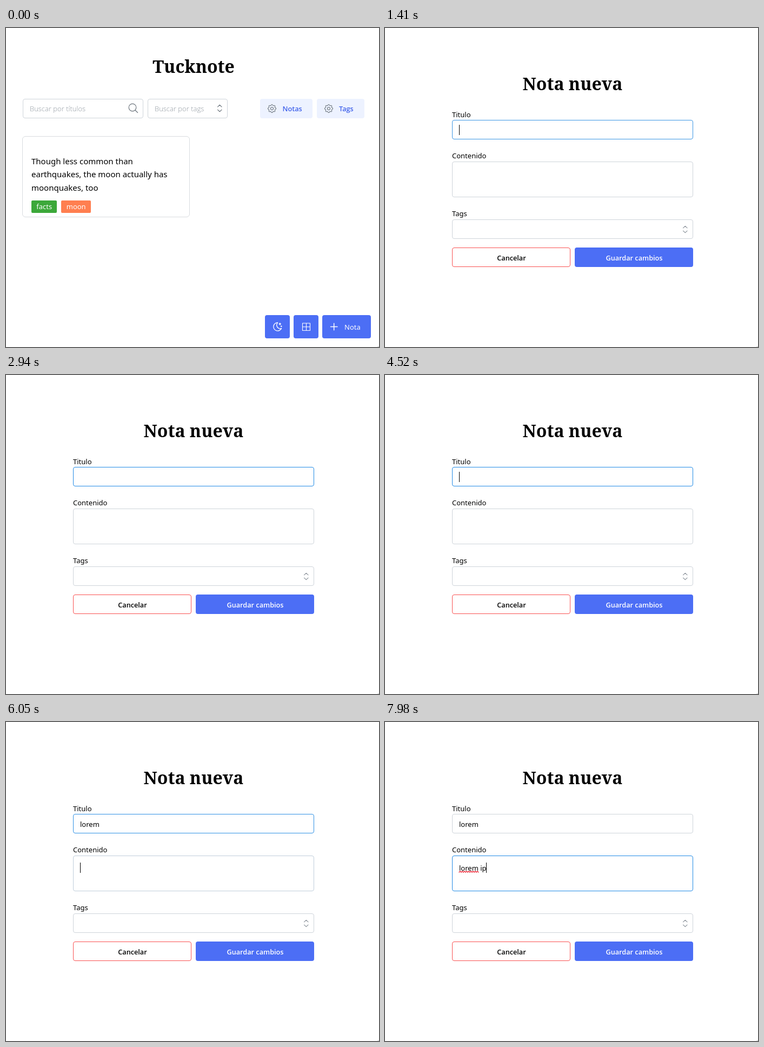
An HTML page that plays this animation: 690x590 px, repeating every 8000 ms.

```html
<!DOCTYPE html>
<html lang="es">
<head>
<meta charset="utf-8">
<title>Notas</title>
<style>
  html, body { margin: 0; width: 100%; height: 100%; overflow: hidden; background: #fff; }
  svg { display: block; width: 690px; height: 590px; }
  text { font: 13px "Noto Sans", "Open Sans", sans-serif; fill: #000; white-space: pre; }
  .title { font: bold 32px "Noto Serif", serif; text-anchor: middle; }
  .strong { font: 600 12.7px "Open Sans", "Noto Sans", sans-serif; }
  .body { font-size: 15px; }
  .hint { font: 300 13px "Open Sans", "Noto Sans", sans-serif; fill: #9199a1; }
  .mid { text-anchor: middle; }
  .white { fill: #fff; }
  .link { fill: #4263eb; }
  .box { fill: #fff; stroke: #ced4da; }
  .blue { fill: #4c6ef5; }
  .hover { fill: #4263eb; }
  .pale { fill: #edf2ff; }
  .icon { fill: none; stroke-linecap: round; stroke-linejoin: round; }
</style>
</head>
<body>
<svg viewBox="0 0 690 590">
  <defs>
    <path id="lobe" d="M10.325 4.317c.426-1.756 2.924-1.756 3.35 0a1.724 1.724 0 0 0 2.573 1.066c1.543-.94 3.31.826 2.37 2.37a1.724 1.724 0 0 0 1.065 2.572"/>
    <g id="gear" class="icon" stroke="#6c757d" stroke-width="1.3" transform="scale(.84) translate(-12 -12)">
      <use href="#lobe"/>
      <use href="#lobe" transform="rotate(90 12 12)"/>
      <use href="#lobe" transform="rotate(180 12 12)"/>
      <use href="#lobe" transform="rotate(270 12 12)"/>
      <circle cx="12" cy="12" r="3"/>
    </g>
    <path id="arrows" class="icon" d="M-3.7-2.6L0-6.2 3.7-2.6M-3.7 2.6L0 6.2 3.7 2.6"/>
  </defs>

  <g id="list">
    <text class="title" x="347" y="83">Tucknote</text>

    <rect class="box" x="31.5" y="131.5" width="222" height="35" rx="3.5"/>
    <text class="hint" x="44" y="154">Buscar por títulos</text>
    <g class="icon" stroke="#6c757d" stroke-width="1.2">
      <circle cx="234" cy="147" r="6.8"/>
      <path d="M239 152l4.5 4.5"/>
    </g>
    <rect class="box" x="262.5" y="131.5" width="147" height="35" rx="3.5"/>
    <text class="hint" x="275" y="154">Buscar por tags</text>
    <use href="#arrows" x="395.3" y="148.5" stroke="#6c757d" stroke-width="1.2"/>

    <rect class="pale" x="470" y="131" width="97" height="36" rx="4"/>
    <use href="#gear" x="492" y="149"/>
    <text class="strong link" x="511.5" y="154">Notas</text>
    <rect class="pale" x="575" y="131" width="88" height="36" rx="4"/>
    <use href="#gear" x="597" y="149"/>
    <text class="strong link" x="616" y="154">Tags</text>

    <rect class="box" x="30.5" y="200.5" width="309" height="149" rx="5.5" style="stroke:#d9dcdf"/>
    <text class="body" x="47" y="252">Though less common than</text>
    <text class="body" x="47" y="276">earthquakes, the moon actually has</text>
    <text class="body" x="47" y="301">moonquakes, too</text>
    <rect x="47" y="319" width="47" height="23" rx="2" fill="#3ca83a"/>
    <text class="mid white" x="70.7" y="335">facts</text>
    <rect x="102" y="319" width="55" height="23" rx="2" fill="#ff7f50"/>
    <text class="mid white" x="129.7" y="335">moon</text>

    <rect class="blue" x="479" y="531" width="46" height="43" rx="4"/>
    <g class="icon" stroke="#fff" stroke-width="1.5" transform="translate(492.3 542.3) scale(.85)">
      <path d="M12 3h.393a7.5 7.5 0 0 0 7.92 12.446a9 9 0 1 1-8.313-12.454z"/>
      <path d="M17 4a2 2 0 0 0 2 2a2 2 0 0 0-2 2a2 2 0 0 0-2-2a2 2 0 0 0 2-2M19 11h2m-1-1v2"/>
    </g>
    <rect id="grid" x="532" y="531" width="46" height="43" rx="4"/>
    <path class="icon" stroke="#fff" stroke-width="1.1" d="M548.5 546h14v13.5h-14zM555.5 546v13.5M548.5 552.7h14"/>
    <g id="add">
      <rect x="585" y="531" width="90" height="43" rx="4"/>
      <path class="icon" stroke="#fff" stroke-width="1.5" d="M600.5 552.5h12.5M606.7 546.3v12.5"/>
      <text class="white" x="626" y="558">Nota</text>
    </g>
  </g>

  <g id="form">
    <text class="title" x="347" y="115">Nota nueva</text>

    <text x="124" y="165">Titulo</text>
    <rect id="nameBox" class="box" x="124.5" y="170.5" width="445" height="35" rx="3.5"/>
    <text id="name" x="137" y="194"></text>

    <text x="124" y="241">Contenido</text>
    <rect id="noteBox" class="box" x="124.5" y="247.5" width="445" height="65" rx="3.5"/>
    <text id="note" x="137" y="275"></text>
    <path id="wave" class="icon" stroke="#e81123" stroke-width="1.1"/>

    <text x="124" y="348">Tags</text>
    <rect class="box" x="124.5" y="354.5" width="445" height="35" rx="3.5"/>
    <use href="#arrows" x="555.3" y="372.5" stroke="#868e96" stroke-width="1.1"/>

    <rect x="124.5" y="406.5" width="218" height="35" rx="3.5" fill="#fff" stroke="#fa5252"/>
    <text class="strong mid" x="234" y="430">Cancelar</text>
    <rect id="save" x="351" y="406" width="219" height="36" rx="4"/>
    <text class="strong mid white" x="461" y="430">Guardar cambios</text>
    <rect id="caret" width="1" height="19"/>
  </g>
  <rect x="688" y="589" width="1" height="1" fill="#888"/>
</svg>

<script>
const LOOP = 8000, OPEN = 1410, NEXT = 6050;
const el = id => document.getElementById(id);

// Each track lists [start time, value]; a value holds until the next one.
const nameText = [[0, ''], [3930, 'o'], [4520, ''], [4920, 'l'], [5120, 'lo'],
  [5220, 'lor'], [5320, 'lore'], [5520, 'lorem']];
const noteText = [[0, ''], [6780, 'l'], [6930, 'lo'], [7040, 'lor'], [7140, 'lore'],
  [7250, 'lorem'], [7450, 'lorem '], [7780, 'lorem i'], [7980, 'lorem ip']];
const nameFocus = [[0, 0.85], [1490, 1], [NEXT, 0.92], [6120, 0]];
const noteFocus = [[0, 0], [NEXT, 0.08], [6120, 1]];
const caretOn = [[0, 1], [1870, 0], [2470, 1], [2940, 0], [3470, 1], [4060, 0], [4520, 1],
  [4600, 0], [4920, 1], [5650, 0], [NEXT, 1], [6580, 0], [6780, 1], [7650, 0], [7780, 1]];

const at = (track, t) => track.findLast(([start]) => start <= t)[1];
const within = (t, from, to) => t >= from && t < to;
const show = (id, on) => { el(id).style.display = on ? '' : 'none'; };
const tint = (id, hovered) => el(id).setAttribute('class', hovered ? 'hover' : 'blue');

function border(id, k) {
  const grey = [206, 212, 218], blue = [34, 139, 230];
  const mix = grey.map((g, i) => Math.round(g + (blue[i] - g) * k));
  el(id).style.stroke = `rgb(${mix})`;
}

function type(id, text) {
  const node = el(id);
  if (node.textContent !== text) node.textContent = text;
}

function placeCaret(t) {
  const inNote = t >= NEXT;
  const field = el(inNote ? 'note' : 'name');
  const width = field.textContent ? field.getComputedTextLength() : 0;
  el('caret').setAttribute('x', Math.floor(137 + width));
  el('caret').setAttribute('y', inNote ? 260 : 179);
  show('caret', at(caretOn, t));
}

function render(t) {
  show('list', t < OPEN);
  show('form', t >= OPEN);
  tint('grid', within(t, 930, 1000));
  tint('save', within(t, 2470, 2540));
  el('add').firstElementChild.setAttribute('class', t >= 1000 ? 'hover' : 'blue');
  el('add').setAttribute('transform', `translate(0 ${t >= 1270 ? 1 : 0})`);
  border('nameBox', at(nameFocus, t));
  border('noteBox', at(noteFocus, t));
  type('name', at(nameText, t));
  type('note', at(noteText, t));
  show('wave', t >= 7450);
  placeCaret(t);
}

el('wave').setAttribute('d', 'M137 278' + 'l2-2l2 2'.repeat(9));

function tick() {
  render(performance.now() % LOOP);
  requestAnimationFrame(tick);
}
tick();
</script>
</body>
</html>
```
